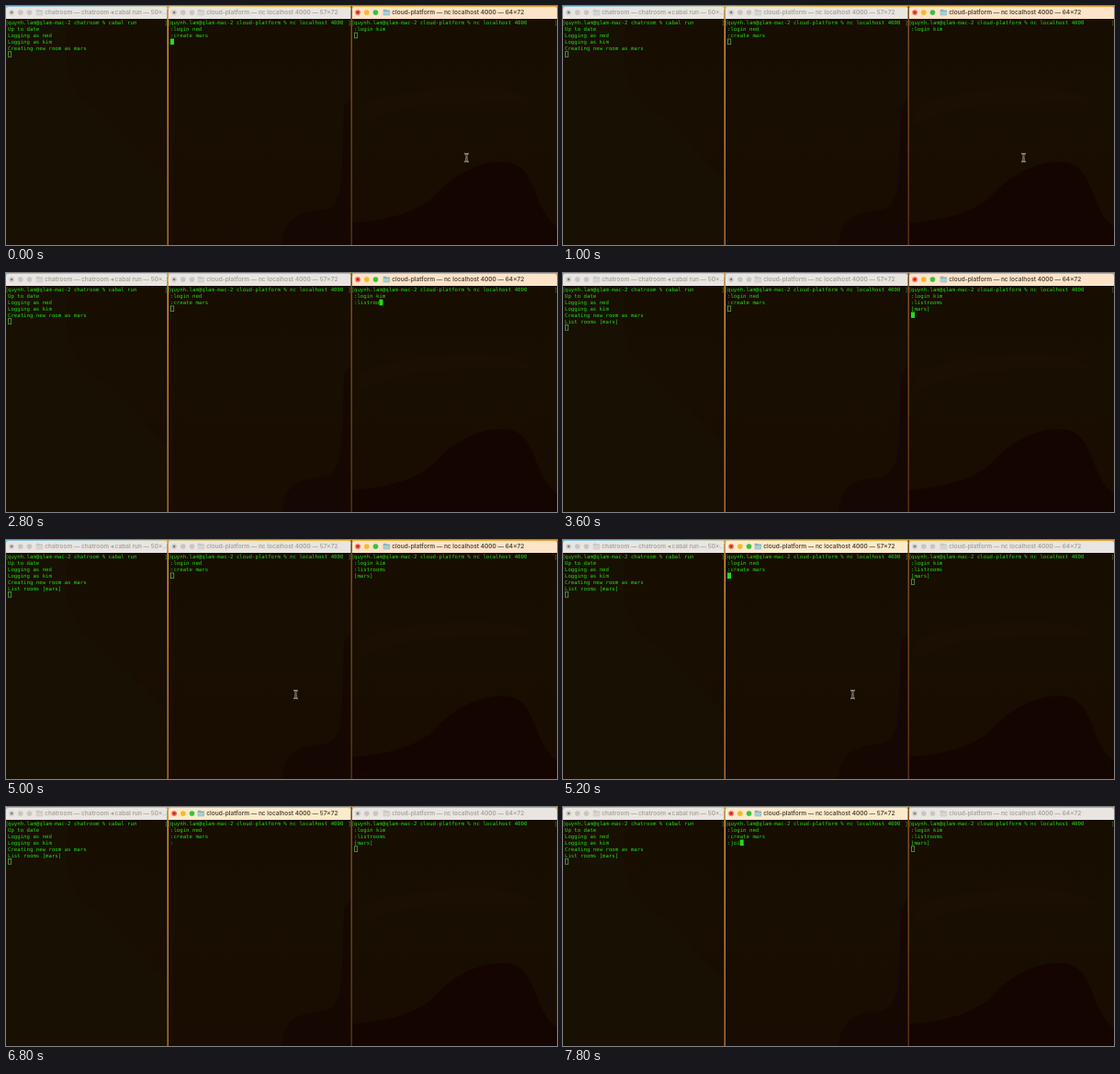
These frames come from a looping animation (600x260 px, 8 s). An HTML page with a canvas:

```html
<!DOCTYPE html>
<html lang="en">
<head>
<meta charset="utf-8">
<title>Chat room in three terminals</title>
<style>
html, body { margin: 0; width: 100%; height: 100%; overflow: hidden; background: #180c02; }
canvas { display: block; width: 600px; height: 260px; }
</style>
</head>
<body>
<canvas id="stage" width="600" height="260"></canvas>
<script>
const ctx = document.getElementById('stage').getContext('2d');
const LOOP = 8000, TICK = 200;
const CELL = 3.43, ROW = 6.85, BASE = 20.4, BAR = 14;
const MONO = '5.7px "DejaVu Sans Mono", monospace';
const GREEN = '#22dc17';
const USER = 'quynh.lam@qlam-mac-2';
const CLOUD = USER + ' cloud-platform % nc localhost 4000';

const wins = [
  { x: 0, w: 175.5, pad: 2, icon: 36.5, title: 'chatroom — chatroom ◂ cabal run — 50×…' },
  { x: 177, w: 198.5, pad: 179, icon: 212.4, tint: '#fcebcb', title: 'cloud-platform — nc localhost 4000 — 57×72' },
  { x: 377, w: 223, pad: 379, icon: 414.4, tint: '#fde4c9', title: 'cloud-platform — nc localhost 4000 — 64×72' }
];

// Last value whose start time has passed, from [time, value] pairs
function at(keys, t) {
  let value = keys[0][1];
  for (const [start, v] of keys) if (t >= start) value = v;
  return value;
}

const listTyped = [[0, 0], [1600, 1], [2200, 3], [2400, 5], [2600, 6], [2800, 8], [3000, 10]];
const joinTyped = [[0, 0], [6200, 1], [7600, 2], [7800, 4]];
const blinkRight = [[0, 0], [200, 1], [800, 0], [1200, 1], [1600, 0], [2000, 1], [4000, 0], [4400, 1], [5000, 0]];
const blinkMid = [[0, 1], [5200, 1], [5800, 0], [6200, 1], [6800, 0], [7400, 1]];

function gradient(x, y, stops) {
  const g = ctx.createLinearGradient(0, 0, x, y);
  stops.forEach((c, i) => g.addColorStop(i / (stops.length - 1), c));
  return g;
}

function disc(x, y, r, color) {
  ctx.fillStyle = color;
  ctx.beginPath();
  ctx.arc(x, y, r, 0, Math.PI * 2);
  ctx.fill();
}

function blob(color, path) {
  ctx.fillStyle = color;
  ctx.fill(new Path2D(path));
}

function backdrop() {
  ctx.fillStyle = gradient(0, 260, ['#170d01', '#190e02', '#190c02']);
  ctx.fillRect(0, 0, 600, 260);
  blob('#181002', 'M0 14H70C60 60 70 95 95 110C125 130 150 165 176 188V260H0Z');
  blob('#150802', 'M300 260C304 230 316 225 345 222C368 218 366 190 368 110L376 100V260Z');
  blob('#1b0f04', 'M380 130C382 108 392 102 420 98C470 88 540 78 582 106C560 104 520 104 480 106C440 108 410 116 380 130Z');
  blob('#140501', 'M377 236C410 234 445 226 465 208C490 180 520 168 545 170C572 172 575 205 585 222Q592 236 600 240V260H377Z');
}

function edge(x, top, bottom) {
  ctx.fillStyle = gradient(0, 260, [top, bottom]);
  ctx.fillRect(x, 0, 1.5, 260);
}

function folder(x, active) {
  ctx.fillStyle = active ? '#86b2c0' : '#c6c6c3';
  ctx.beginPath();
  ctx.roundRect(x - 3.7, 3.8, 3.6, 3, 0.6);
  ctx.roundRect(x - 3.7, 4.6, 7.4, 5.7, 0.8);
  ctx.fill();
  ctx.fillStyle = active ? '#abcdd6' : '#d6d5d2';
  ctx.fillRect(x - 3.3, 6, 6.6, 3.8);
}

function titleBar(win, active) {
  ctx.fillStyle = active ? win.tint : '#e9e6e1';
  ctx.beginPath();
  ctx.roundRect(win.x, 1, win.w, BAR - 1, [3, 3, 0, 0]);
  ctx.fill();
  const lights = active ? ['#f5574c', '#f5b92f', '#35c241'] : Array(3).fill('#c9c6c2');
  lights.forEach((c, i) => disc(win.x + 6.1 + i * 9.7, 7, 2.8, c));
  disc(win.x + 6.1, 7, 1, active ? '#8c1a14' : '#66625e');
  folder(win.icon, active);
  ctx.font = '600 6.5px Inter, "Open Sans", sans-serif';
  ctx.fillStyle = active ? '#51463b' : '#a7a29c';
  ctx.fillText(win.title, win.icon + 5.8, 9.4);
}

function cursor(win, row, col, mode) {
  const x = win.pad + col * CELL, y = BASE + row * ROW - 5.4;
  if (mode === 'solid') {
    ctx.fillStyle = GREEN;
    ctx.fillRect(x, y, 4, 6.5);
  } else if (mode === 'hollow') {
    ctx.strokeStyle = '#58a648';
    ctx.lineWidth = 0.8;
    ctx.strokeRect(x + 0.4, y + 0.4, 3.3, 5.7);
  }
}

function bracket(x, tip) {
  ctx.beginPath();
  ctx.moveTo(x + tip, 16);
  ctx.lineTo(x, 16);
  ctx.lineTo(x, 21);
  ctx.lineTo(x + tip, 21);
  ctx.stroke();
}

// The last line holds the cursor
function terminal(win, lines, mode) {
  ctx.font = MONO;
  ctx.fillStyle = GREEN;
  lines.forEach((line, i) => ctx.fillText(line, win.pad, BASE + i * ROW));
  ctx.strokeStyle = '#4f7a35';
  ctx.lineWidth = 0.6;
  bracket(win.x + 0.8, 1);
  bracket(win.x + win.w - 1.2, -1);
  cursor(win, lines.length - 1, lines[lines.length - 1].length, mode);
}

function pointer(x, y) {
  const p = new Path2D();
  for (const s of [-1, 1]) {
    p.moveTo(x - 2.5, y + s * 4.5);
    p.quadraticCurveTo(x, y + s * 4.5, x, y + s * 2.5);
    p.quadraticCurveTo(x, y + s * 4.5, x + 2.5, y + s * 4.5);
  }
  p.moveTo(x, y - 3);
  p.lineTo(x, y + 3);
  p.moveTo(x - 1.3, y + 1.5);
  p.lineTo(x + 1.3, y + 1.5);
  ctx.strokeStyle = '#c4bfb8';
  ctx.lineWidth = 1.6;
  ctx.stroke(p);
  ctx.strokeStyle = '#302a25';
  ctx.lineWidth = 0.6;
  ctx.stroke(p);
}

function drawPointer(t) {
  if (t < 1600) pointer(501.5, 165);
  else if (t >= 4000 && t < 6200) {
    const p = Math.min(1, (t - 3800) / 1000);
    const k = p * p * (3 - 2 * p);
    pointer(501.5 - 186 * k, 165 + 3 * k + 9 * Math.sin(Math.PI * k));
  }
}

function draw(t) {
  const midActive = t >= 5200, listed = t >= 3200;
  backdrop();
  ctx.fillStyle = gradient(600, 0, ['#86c0e2', '#c3cdb4', '#f0b63c', '#f0b440', '#eda338']);
  ctx.fillRect(0, 0, 600, 4);
  edge(175.5, '#d9963f', '#ae6a30');
  edge(375.5, '#805022', '#54300f');
  wins.forEach((win, i) => titleBar(win, i === (midActive ? 1 : 2)));

  const log = [USER + ' chatroom % cabal run', 'Up to date', 'Logging as ned',
    'Logging as kim', 'Creating new room as mars'];
  if (listed) log.push('List rooms [mars]');
  terminal(wins[0], [...log, ''], 'hollow');

  const midMode = t < 200 || midActive ? (at(blinkMid, t) ? 'solid' : 'off') : 'hollow';
  terminal(wins[1], [CLOUD, ':login ned', ':create mars', ':join'.slice(0, at(joinTyped, t))], midMode);

  const rightMode = t < 200 || midActive ? 'hollow' : at(blinkRight, t) ? 'solid' : 'off';
  const right = [CLOUD, ':login kim', ':listrooms'.slice(0, at(listTyped, t))];
  if (listed) right.push('[mars]', '');
  terminal(wins[2], right, rightMode);

  drawPointer(t);
}

let begin = null;
function frame(now) {
  if (begin === null) begin = now;
  const t = (now - begin) % LOOP;
  draw(Math.floor(t / TICK) * TICK);
  requestAnimationFrame(frame);
}
draw(0);
requestAnimationFrame(frame);
</script>
</body>
</html>
```
